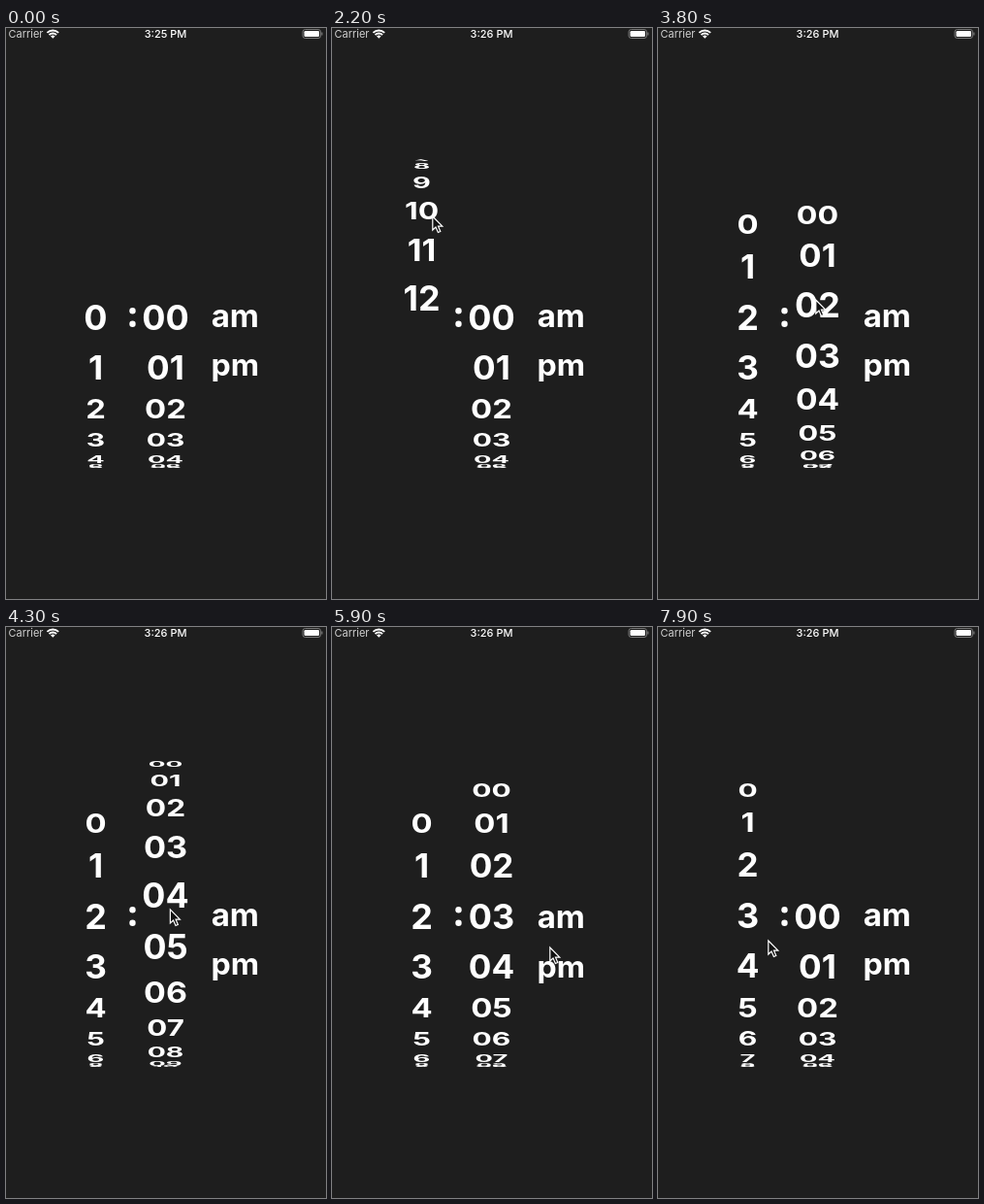
An HTML page with a canvas that plays this animation: 330 by 588 pixels, repeating every 8 s.

```html
<!DOCTYPE html>
<html lang="en">
<head>
<meta charset="utf-8">
<title>Time picker wheels</title>
<style>
  html, body { margin: 0; width: 100%; height: 100%; overflow: hidden; background: #1e1e1e; }
  canvas { display: block; width: 330px; height: 588px; }
</style>
</head>
<body>
<canvas id="stage" width="330" height="588"></canvas>
<script>
const ctx = document.getElementById('stage').getContext('2d');
const LOOP = 8000, STEP = 100;
const CENTER = 294.5, RADIUS = 158, ROWS_VISIBLE = 6.2;

const range = (n, label) => Array.from({ length: n }, (_, i) => label(i));
const ramp = (t, from, to) => Math.min(1, Math.max(0, (t - from) / (to - from)));
const ease = (t, from, to) => {
  const p = ramp(t, from, to);
  return p * p * (3 - 2 * p);
};
const bump = (t, from, to) => Math.sin(Math.PI * ramp(t, from, to));

// Scroll positions in rows: each drag or settle adds its own eased move
const hourScroll = t =>
  7 * ease(t, 800, 1700) + 5.37 * ease(t, 1700, 2200) - 0.37 * ease(t, 2200, 2400)
  - 10 * ease(t, 2500, 3000) + 1.02 * ease(t, 7300, 7900);
const minuteScroll = t =>
  2.25 * ease(t, 3400, 3800) + 4.25 * ease(t, 3800, 4050) - 3.58 * ease(t, 4050, 4500)
  + 0.08 * ease(t, 4900, 5100) - 3.75 * ease(t, 6600, 7200) + 0.75 * ease(t, 7200, 7500);
const periodScroll = t => 1.1 * bump(t, 5900, 6400) - 0.05 * bump(t, 5500, 6300);

const wheels = [
  { x: 92.5, labels: range(13, String), scroll: hourScroll, size: 36, baseline: 16.5 },
  { x: 164.5, labels: range(60, n => String(n).padStart(2, '0')), scroll: minuteScroll, size: 36, baseline: 16.5 },
  { x: 236.3, labels: ['am', 'pm'], scroll: periodScroll, size: 33, baseline: 13 }
];

// Places where the pointer arrives
const GLIDE = 800;
const stops = [
  { t: 0, x: 330, y: 315 },
  { t: 700, x: 93, y: 411 },
  { t: 2200, x: 103, y: 193 },
  { t: 3000, x: 100, y: 350 },
  { t: 3800, x: 162, y: 279 },
  { t: 4900, x: 204, y: 349 },
  { t: 5900, x: 224, y: 329 },
  { t: 7200, x: 148, y: 433 },
  { t: 7900, x: 113, y: 322 }
];

function cursorAt(t) {
  const place = { ...stops[0] };
  stops.slice(1).forEach((stop, i) => {
    const p = ease(t, Math.max(stops[i].t, stop.t - GLIDE), stop.t);
    place.x += (stop.x - stops[i].x) * p;
    place.y += (stop.y - stops[i].y) * p;
  });
  place.y -= 110 * bump(t, 800, 1700) + 50 * bump(t, 5900, 6400);
  return place;
}

function text(label, x, y, size, weight, align = 'center') {
  ctx.font = `${weight} ${size}px Inter, sans-serif`;
  ctx.textAlign = align;
  ctx.fillText(label, x, y);
}

function drawWheel({ x, labels, scroll, size, baseline }, t) {
  const position = scroll(t);
  labels.forEach((label, i) => {
    const row = i - position;
    if (Math.abs(row) > ROWS_VISIBLE) return;
    // Rows crowd together towards the rim; those past it appear upside down
    const angle = row * (19.6 - 0.52 * Math.abs(row)) * Math.PI / 180;
    const cos = Math.cos(angle);
    const width = 1 / (1 + 0.48 * (1 - cos));
    const squash = Math.sign(cos) * Math.max(Math.abs(cos) * Math.sqrt(width), 0.07);
    ctx.save();
    ctx.translate(x, CENTER + RADIUS * Math.sin(angle));
    ctx.scale(width, squash);
    text(label, 0, baseline, size, 700);
    ctx.restore();
  });
}

function dot(x, y, r) {
  ctx.beginPath();
  ctx.arc(x, y, r, 0, 2 * Math.PI);
  ctx.fill();
}

function drawWifi(x, y) {
  const arc = r => ctx.arc(x, y, r, -Math.PI * 0.75, -Math.PI * 0.25);
  ctx.lineWidth = 1.9;
  for (const r of [8.3, 5.3]) {
    ctx.beginPath();
    arc(r);
    ctx.stroke();
  }
  ctx.beginPath();
  ctx.moveTo(x, y);
  arc(3.2);
  ctx.fill();
}

function drawBattery(x, y) {
  ctx.lineWidth = 1;
  ctx.strokeStyle = '#777';
  ctx.beginPath();
  ctx.roundRect(x, y, 18.5, 9, 2.5);
  ctx.stroke();
  ctx.beginPath();
  ctx.roundRect(x + 1.5, y + 1.5, 15.5, 6, 1.3);
  ctx.fill();
  ctx.fillStyle = '#777';
  ctx.fillRect(x + 19.3, y + 3, 1.2, 3);
}

function drawStatusBar(t) {
  ctx.fillStyle = '#d0d0d0';
  text('Carrier', 2.5, 10, 11, 400, 'left');
  ctx.fillStyle = ctx.strokeStyle = '#fff';
  text(t < 1300 ? '3:25 PM' : '3:26 PM', 164.5, 10, 11, 500);
  drawWifi(48.3, 10.8);
  drawBattery(306, 1.5);
}

function drawCursor(t) {
  const { x, y } = cursorAt(t);
  ctx.save();
  ctx.translate(x + 0.8, y + 1);
  ctx.fillStyle = '#111';
  ctx.strokeStyle = '#fff';
  ctx.lineWidth = 1.2;
  const arrow = new Path2D('M0 0V14L3.2 11L5.6 16.5L8 15.5L5.7 10.2H10Z');
  ctx.fill(arrow);
  ctx.stroke(arrow);
  ctx.restore();
}

function draw(now) {
  const t = Math.floor((now % LOOP) / STEP) * STEP;
  ctx.fillStyle = '#1e1e1e';
  ctx.fillRect(0, 0, 330, 588);
  drawStatusBar(t);
  ctx.fillStyle = '#fff';
  dot(130.5, 291.3, 3.2);
  dot(130.5, 304.7, 3.2);
  wheels.forEach(wheel => drawWheel(wheel, t));
  drawCursor(t);
}

const start = performance.now();
function tick() {
  draw(performance.now() - start);
  requestAnimationFrame(tick);
}
tick();
</script>
</body>
</html>
```
